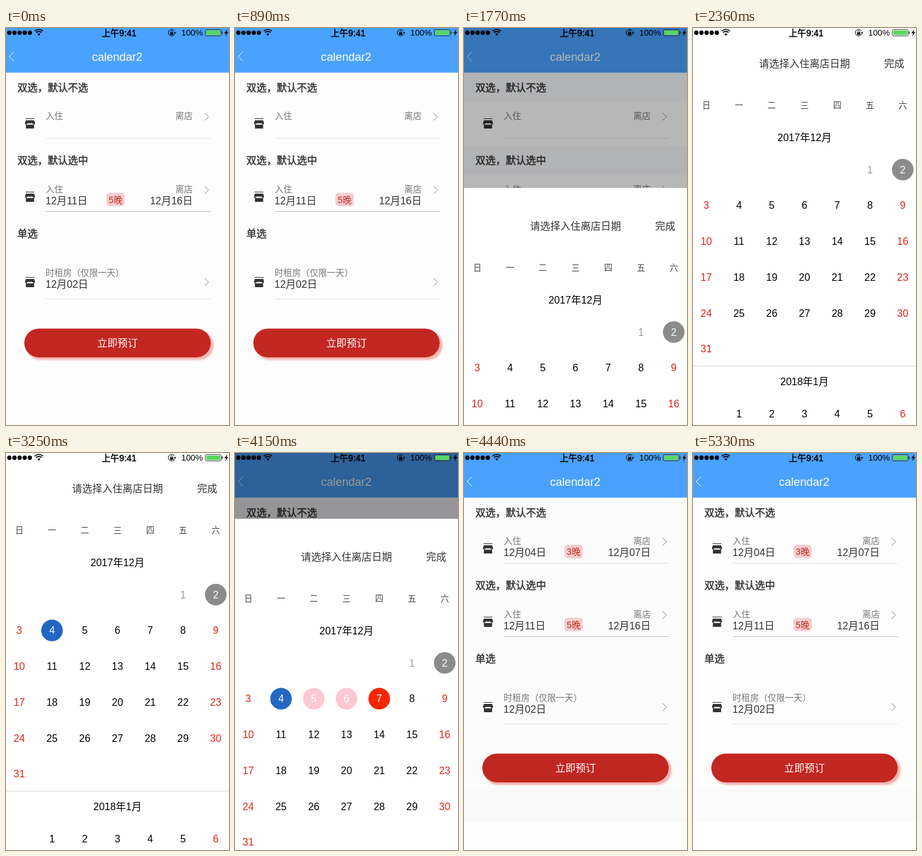
An HTML page that plays this animation: 353 px wide and 628 px high, repeating every 5430 ms.

```html
<!DOCTYPE html>
<html lang="zh-CN">
<head>
<meta charset="utf-8">
<title>calendar2</title>
<style>
  html, body { margin: 0; width: 100%; height: 100%; overflow: hidden; background: #fdfdfd; }
  svg { display: block; width: 353px; height: 628px; }
  text { font: 16px "Liberation Sans", "Noto Sans CJK SC", "Noto Sans CJK", sans-serif; fill: #333; }
  .mid { text-anchor: middle; }
  .end { text-anchor: end; }
  .head { stroke: #333; stroke-width: .45px; }
  .label { font-size: 13.8px; fill: #777; }
  .night { font-size: 14px; fill: #c32721; text-anchor: middle; }
  .title { font-size: 18.2px; fill: #fff; text-anchor: middle; }
  .week { font-size: 13.2px; fill: #444; text-anchor: middle; }
  .clock { font-size: 14px; fill: #000; stroke: #000; stroke-width: .45px; text-anchor: middle; }
  .power { font-size: 13.3px; fill: #000; text-anchor: end; }
  .black { fill: #000; }
  .white { fill: #fff; }
  .red { fill: #e0231a; }
  .grey { fill: #999; }
  .thin { fill: none; stroke: #888; stroke-width: 1; }
</style>
</head>
<body>
<svg viewBox="0 0 353 628">
  <defs>
    <filter id="soft" x="-10%" y="-30%" width="120%" height="170%"><feGaussianBlur stdDeviation="1.6"/></filter>
    <g id="shop">
      <path d="M2 0H16V1H2ZM2.5 3H15.5L17 7.5Q17 9 15.5 9.5V16H2.5V9.5Q1 9 1 7.5Z" fill="#333"/>
      <path d="M4 8.3Q5.7 10.4 7.3 8.3Q9 10.4 10.7 8.3Q12.3 10.4 14 8.3" fill="none" stroke="#fff" stroke-width="1.8"/>
    </g>
  </defs>
  <g id="page"></g>
  <rect id="dim" width="353" height="628"/>
  <g id="sheet"></g>
  <g id="status"></g>
</svg>
<script>
const LOOP = 5430;
const $ = id => document.getElementById(id);
const text = (x, y, s, cls = '') => `<text x="${x}" y="${y}" class="${cls}">${s}</text>`;
const rect = (x, y, w, h, fill, more = '') =>
  `<rect x="${x}" y="${y}" width="${w}" height="${h}" fill="${fill}" ${more}/>`;
const group = (id, body) => `<g id="${id}">${body}</g>`;
const chevron = y => `<path class="thin" d="M314.5 ${y - 6}l6 6l-6 6"/>`;
const shop = y => `<use href="#shop" x="29" y="${y}"/>`;

// ---- booking page ----
const dates = (y, from, nights, to) =>
  text(62.5, y, from) + text(295.5, y, to, 'end') +
  rect(159, y - 18, 29, 21.5, '#f6cfd0', 'rx="5.5"') + text(173.5, y - 2, nights + '晚', 'night');

const stay = (y, line) =>
  text(62.8, y + 27.6, '入住', 'label') + text(295.5, y + 27.6, '离店', 'label end') +
  shop(y + 27) + chevron(y + 24.3) + rect(63, y + 58, 261, 1, line);

$('page').innerHTML =
  rect(0, 0, 353, 628, '#fdfdfd') +
  group('tail', rect(0, 532, 353, 52, '#fbfbfb') + rect(0, 584, 353, 44, '#fff')) +
  group('bands', [71, 187, 303].map(y => rect(0, y, 353, 45, '#f7f8fb')).join('')) +
  rect(0, 0, 353, 70.6, '#4aa2ff') +
  '<path class="thin" style="stroke:#fff" d="M12.5 37.5L5 45L12.5 52.5"/>' +
  text(176, 51.5, 'calendar2', 'title') +
  text(18, 99.5, '双选，默认不选', 'head') + stay(116, '#e6e6e6') +
  group('picked', dates(163, '12月04日', 3, '12月07日')) +
  text(18, 215, '双选，默认选中', 'head') + stay(232, '#c2c2c2') +
  dates(278.5, '12月11日', 5, '12月16日') +
  text(18, 331, '单选', 'head') +
  text(62.8, 391.6, '时租房（仅限一天）', 'label') + text(62.5, 411, '12月02日') +
  shop(394) + chevron(402) + rect(63, 428, 261, 1, '#e4e4e4') +
  rect(31.5, 478.5, 297, 46.5, '#e0443e', 'rx="23" opacity=".4" filter="url(#soft)"') +
  rect(29, 475.4, 295, 45.6, '#c32721', 'rx="22.8"') +
  text(176.5, 504, '立即预订', 'mid white');

// ---- calendar sheet ----
const colX = c => 21 + c * 51.83;
const rowY = r => 224 + r * 56.7;
const disc = (c, r, fill, n) =>
  `<circle cx="${colX(c)}" cy="${rowY(r)}" r="17.1" fill="${fill}"/>` +
  text(colX(c), rowY(r) + 5.7, n, 'mid white');

let days = '';
for (let n = 1; n <= 31; n++) {
  const slot = n + 4, c = slot % 7, r = Math.floor(slot / 7);
  const cls = n === 1 ? 'grey' : c % 6 ? 'black' : 'red';
  days += n === 2 ? disc(c, r, '#8b8b8b', n) : text(colX(c), rowY(r) + 5.7, n, 'mid ' + cls);
}
for (let n = 1; n <= 6; n++) days += text(colX(n), 615.5, n, 'mid ' + (n < 6 ? 'black' : 'red'));

$('sheet').innerHTML =
  rect(0, -4, 353, 644, '#fff') +
  text(176.6, 62, '请选择入住离店日期', 'mid') + text(318.5, 62, '完成', 'mid') +
  [...'日一二三四五六'].map((d, i) => text(colX(i), 126.7, d, 'week')).join('') +
  text(176.5, 179, '2017年12月', 'mid black') + days +
  rect(0, 534.5, 353, 1, '#d8d8d8') + text(176.5, 564.5, '2018年1月', 'mid black') +
  group('first', disc(1, 1, '#2366c4', 4)) +
  group('range', disc(2, 1, '#fcc8d3', 5) + disc(3, 1, '#fcc8d3', 6) + disc(4, 1, '#f92600', 7));

// ---- status bar ----
const arc = r =>
  `<path d="M${52 - r * .72} ${11.5 - r * .72}A${r} ${r} 0 0 1 ${52 + r * .72} ${11.5 - r * .72}" fill="none" stroke="#000" stroke-width="1.7"/>`;

$('status').innerHTML =
  [0, 1, 2, 3, 4].map(i => `<circle cx="${5.3 + i * 8.1}" cy="7.5" r="3.4"/>`).join('') +
  arc(9) + arc(6) + '<path d="M52 12.3L49.6 9.6A3.4 3.4 0 0 1 54.4 9.6Z"/>' +
  text(179, 12.5, '上午9:41', 'clock') +
  '<path d="M266.5 4.4A5.2 5.2 0 1 0 267.3 8.5" fill="none" stroke="#000"/><path d="M265.6 6.5h4l-2 2.5z"/>' +
  rect(259.8, 7, 5, 3.8, '#000') +
  '<path d="M260.8 7V5.8a1.5 1.5 0 0 1 3 0V7" fill="none" stroke="#000" stroke-width=".9"/>' +
  text(311.5, 12.3, '100%', 'power') +
  rect(315.5, 2.5, 25, 10, 'none', 'rx="1.8" stroke="#333" stroke-width=".9"') +
  rect(317, 4, 22, 7, '#58d660') + rect(341.5, 5.5, 1.5, 4, '#333') +
  '<path d="M350.5 2L345.5 8.2H348.3L347 13L352 6.6H349.2Z"/>';

// Each step is [ms, value] and holds until the next one.
function hold(id, prop, steps) {
  const frames = steps.map(([ms, v]) => ({ [prop]: v, offset: ms / LOOP, easing: 'step-end' }));
  frames.push({ [prop]: steps[steps.length - 1][1], offset: 1 });
  $(id).animate(frames, { duration: LOOP, iterations: Infinity });
}
const show = (id, from, to = LOOP) =>
  hold(id, 'opacity', [[0, 0], [from, 1], ...(to < LOOP ? [[to, 0]] : [])]);
const drop = (ms, y) => [ms, `translateY(${y}px)`];

hold('sheet', 'transform', [drop(0, 640), drop(1770, 257), drop(1920, 0), drop(4150, 108), drop(4290, 588), drop(4440, 640)]);
hold('dim', 'opacity', [[0, 0], [1630, .04], [1770, .28], [1920, .5], [4150, .4], [4290, .095], [4440, .008], [4590, 0]]);
show('bands', 1630, 4290);
show('first', 2810);
show('range', 3700);
show('picked', 4000);
show('tail', 4440);
</script>
</body>
</html>
```
